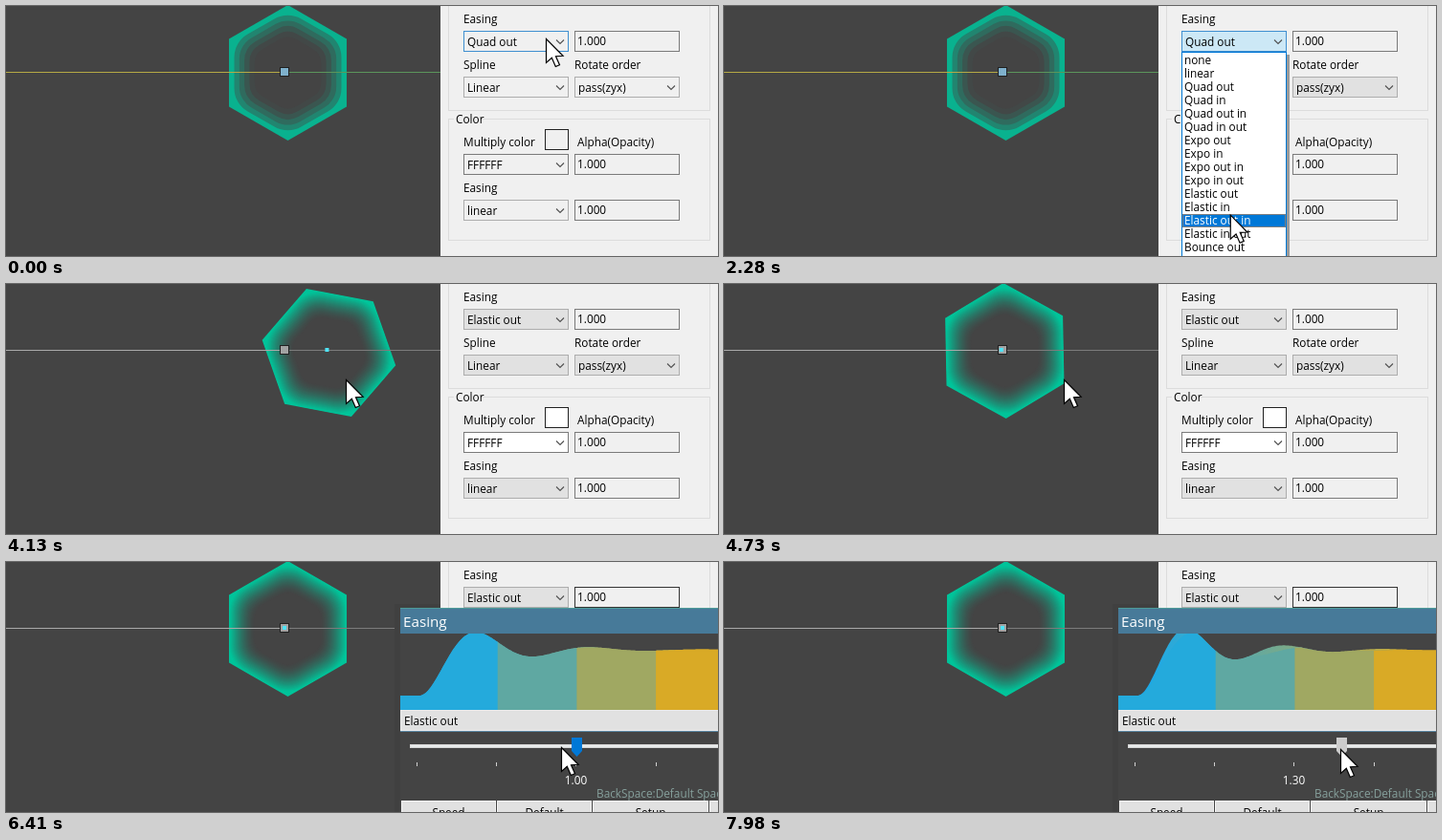
Recreate the animation shown at these times as an HTML page with a canvas. Size 744 by 262 pixels, loop 8000 ms.

```html
<!DOCTYPE html>
<html lang="en">
<head>
<meta charset="utf-8">
<title>Easing editor</title>
<style>
html, body { margin: 0; width: 744px; height: 262px; overflow: hidden; background: #444; }
canvas { display: block; }
</style>
</head>
<body>
<canvas id="stage" width="744" height="262"></canvas>
<script>
const ctx = document.getElementById('stage').getContext('2d');
const LOOP = 8000, STEP = 220 / 3;
const OPEN = 70, PICK = 2710, BLUR = 3740, SPIN = 4033, DIALOG = 5860, DRAG = 6670;
const PANEL = '#f0f0f0', FACE = '#e1e1e1', DARK = '#444444', BLUE = '#0078d7';
const ROW = 14, LIST_TOP = 50;

const MODES = ['out', 'in', 'out in', 'in out'];
const EASINGS = ['none', 'linear', ...['Quad', 'Expo', 'Elastic', 'Bounce'].flatMap(f => MODES.map(m => `${f} ${m}`))];

// Where the pointer turns: time, x, y.
const PATH = [[80, 564, 34], [880, 541, 125], [1760, 532, 243], [PICK, 526, 198], [3600, 355, 100], [5030, 355, 100],
  [5830, 648, 20], [6380, 580, 194], [DRAG, 595, 195], [7310, 637, 195], [7920, 644, 196]];

function pointerAt(t) {
  const next = PATH.findIndex(p => p[0] >= t);
  if (next < 1) return PATH.at(next).slice(1);
  const [a, b] = [PATH[next - 1], PATH[next]];
  const k = (t - a[0]) / (b[0] - a[0]);
  return [a[1] + (b[1] - a[1]) * k, a[2] + (b[2] - a[2]) * k];
}

// Damped swing from 1 to 0; n counts half periods, ratio is the size left after each.
function swing(n, ratio) {
  if (n <= 0) return 1;
  const damp = -Math.log(ratio);
  return Math.exp(-damp * n) * (Math.cos(Math.PI * n) + damp / Math.PI * Math.sin(Math.PI * n));
}

function rect(x, y, w, h, fill) {
  ctx.fillStyle = fill;
  ctx.fillRect(x, y, w, h);
}

function box(x, y, w, h, fill, border) {
  rect(x, y, w, h, border);
  rect(x + 1, y + 1, w - 2, h - 2, fill);
}

function text(str, x, y, color = '#000', size = 11.8, align = 'left') {
  ctx.font = `${size}px "Open Sans", "Noto Sans", sans-serif`;
  ctx.textAlign = align;
  ctx.fillStyle = color;
  ctx.fillText(str, x, y);
}

function trace(points) {
  ctx.beginPath();
  points.forEach(([x, y]) => ctx.lineTo(x, y));
}

function combo(str, x, y, fill, border = '#adadad') {
  box(x, y, 110, 22, fill, border);
  text(str, x + 4, y + 16);
  trace([-4, 0, 4].map(d => [x + 101 + d, y + 13.5 - Math.abs(d)]));
  ctx.strokeStyle = '#505050';
  ctx.lineWidth = 1.1;
  ctx.stroke();
}

function field(y, border = '#7a7a7a') {
  box(594, y, 110, 22, PANEL, border);
  text('1.000', 597, y + 15);
}

function hexPath(radius) {
  trace([0, 1, 2, 3, 4, 5].map(i => [radius * Math.sin(i * Math.PI / 3), -radius * Math.cos(i * Math.PI / 3)]));
  ctx.closePath();
}

function mix(from, to, k) {
  return `rgb(${from.map((c, i) => Math.round(c + (to[i] - c) * k))})`;
}

// Nested rounded hexagons fade the green edge into the background.
function hexagon(shift, banded) {
  const edge = banded ? [9, 178, 143] : [0, 196, 154];
  const step = banded ? 5.3 : 1;
  ctx.save();
  ctx.translate(291 + shift, 69);
  ctx.rotate(shift / 393 * 2 * Math.PI);
  ctx.translate(3.5, 1);
  hexPath(71);
  ctx.fillStyle = mix(edge, edge, 0);
  ctx.fill();
  ctx.clip();
  ctx.lineJoin = 'round';
  for (let size = banded ? 56 : 61; size > 34; size -= step) {
    const k = Math.max(0, (size - step / 2 - 34) / 27) ** 1.6;
    ctx.fillStyle = ctx.strokeStyle = mix([68, 68, 68], edge, k);
    ctx.lineWidth = size;
    hexPath(size * 0.577);
    ctx.fill();
    ctx.stroke();
  }
  ctx.restore();
}

function drawStage(t) {
  const banded = t < SPIN;
  const shift = banded ? 0 : -393 * swing((t - SPIN) / 111.8, 0.385);
  rect(0, 0, 454, 262, DARK);
  hexagon(shift, banded);
  rect(0, 69, 287, 1, banded ? '#b5a945' : '#a9a9a9');
  rect(295, 69, 159, 1, banded ? '#5b955b' : '#7c7c7c');
  box(286, 64, 10, 10, banded ? '#7fb1cc' : '#a2a2a2', '#202020');
  if (!banded) rect(289 + shift, 67, 4, 4, '#4fe3f5');
}

function drawPanel(t) {
  const face = t < OPEN ? PANEL : FACE;
  const paper = t < PICK ? PANEL : '#fff';
  const focused = t < BLUR;
  const easingFace = t < OPEN ? PANEL : t < PICK ? '#cce8f6' : focused ? '#e5f1fb' : FACE;
  rect(454, 0, 290, 262, PANEL);
  box(462, -9, 274, 119, PANEL, '#dcdcdc');
  box(462, 118, 274, 128, PANEL, '#dcdcdc');
  rect(468, 117, 31, 3, PANEL);
  text('Color', 470, 123);

  text('Easing', 478, 18);
  combo(t < PICK ? 'Quad out' : 'Elastic out', 478, 26, easingFace, focused ? '#3f8fd0' : '#adadad');
  field(26, t >= DIALOG ? '#333' : '#7a7a7a');
  text('Spline', 478, 66);
  text('Rotate order', 594, 66);
  combo('Linear', 478, 74, face);
  combo('pass(zyx)', 594, 74, face);

  text('Multiply color', 478, 147);
  box(563, 129, 25, 22, paper, '#222');
  text('Alpha(Opacity)', 597, 147);
  combo('FFFFFF', 478, 155, paper, '#7a7a7a');
  field(155);
  text('Easing', 478, 195);
  combo('linear', 478, 203, face);
  field(203);
}

function drawList(pointerY) {
  const active = pointerY < LIST_TOP ? 2 : Math.floor((pointerY - LIST_TOP) / ROW);
  rect(588, 51, 3, 211, '#9a9a9a');
  box(478, 48, 110, 230, '#fff', BLUE);
  EASINGS.forEach((name, i) => {
    const y = LIST_TOP + ROW * i;
    if (i === active) {
      rect(479, y, 108, ROW, BLUE);
      ctx.strokeStyle = '#ff8728';
      ctx.lineWidth = 1;
      ctx.setLineDash([1, 1]);
      ctx.strokeRect(479.5, y + 0.5, 107, ROW - 1);
      ctx.setLineDash([]);
    }
    text(name, 481, y + 11, i === active ? '#fff' : '#000');
  });
}

function curve(value) {
  const half = 59 - (value - 1) * 26.7, ratio = 0.385 + (value - 1) * 0.25;
  return x => 92 + 48 * swing((x - 432) / half, ratio);
}

function clipUnder(height, paint) {
  ctx.save();
  ctx.beginPath();
  ctx.rect(412, 75, 332, 81);
  ctx.clip();
  ctx.beginPath();
  ctx.moveTo(412, 156);
  for (let x = 412; x <= 744; x++) ctx.lineTo(x, height(x));
  ctx.lineTo(744, 156);
  ctx.clip();
  paint();
  ctx.restore();
}

function drawChart(value) {
  const start = curve(1), now = curve(value);
  const blend = ctx.createLinearGradient(430, 0, 744, 0);
  blend.addColorStop(0, '#12a9f3');
  blend.addColorStop(1, '#e0aa20');
  clipUnder(now, () => rect(412, 75, 332, 81, blend));
  // Parts under both curves keep the flat colours.
  clipUnder(x => Math.max(start(x), now(x)), () => {
    ['#24aadc', '#5fa8a2', '#a0a862', '#d9aa26'].forEach((color, i) => rect(431 + 82.7 * i - (i ? 0 : 19), 75, 102, 81, color));
  });
}

function drawDialog(t, pointerX) {
  const dragging = t >= DRAG;
  const thumb = dragging ? pointerX + 1.5 : 596.5;
  const value = 1 + (thumb - 596.5) / 165;
  rect(406, 44, 48, 218, '#404040');
  rect(412, 48, 332, 214, DARK);
  rect(412, 48, 332, 27, '#477a99');
  rect(412, 48, 332, 1, '#4d9a98');
  text('Easing', 415, 68, '#fff', 15.2);
  drawChart(value);

  box(412, 155, 340, 22, FACE, '#ececec');
  rect(412, 177, 332, 1, '#5b87a3');
  text('Elastic out', 416, 171);

  box(422, 191, 340, 4, '#e7eaea', '#d6d6d6');
  for (let x = 429; x < 700; x += 83.4) rect(Math.floor(x), 210, 1, 4, '#d0d0d0');
  trace([[-5.5, 184], [5.5, 184], [5.5, 198], [0, 204], [-5.5, 198]].map(([x, y]) => [x + thumb, y]));
  ctx.fillStyle = dragging ? '#cccccc' : BLUE;
  ctx.fill();
  text(value.toFixed(2), 595.5, 233, '#fff', 11.8, 'center');
  text('BackSpace:Default Space', 617, 247, '#86a09c');

  [['Speed', 413, 99], ['Default', 513, 99], ['Setup', 613, 121], ['', 735, 60]].forEach(([name, x, w]) => {
    box(x, 250, w, 24, FACE, '#f4f4f4');
    text(name, x + w / 2, 267, '#000', 11.8, 'center');
  });
}

function drawPointer(x, y) {
  ctx.save();
  ctx.translate(x + 0.5, y + 0.5);
  trace([[0, 0], [0, 25], [5.8, 19.8], [9.8, 29], [14, 27.2], [10, 18.2], [17.6, 17.8]]);
  ctx.closePath();
  ctx.fillStyle = '#fff';
  ctx.strokeStyle = '#000';
  ctx.lineWidth = 1.2;
  ctx.lineJoin = 'miter';
  ctx.fill();
  ctx.stroke();
  ctx.restore();
}

function frame(now) {
  const t = Math.floor(now % LOOP / STEP) * STEP;
  const [x, y] = pointerAt(t);
  drawPanel(t);
  drawStage(t);
  if (t >= OPEN && t < PICK) drawList(y);
  if (t >= DIALOG) drawDialog(t, x);
  drawPointer(x, y);
  requestAnimationFrame(frame);
}
requestAnimationFrame(frame);
</script>
</body>
</html>
```
